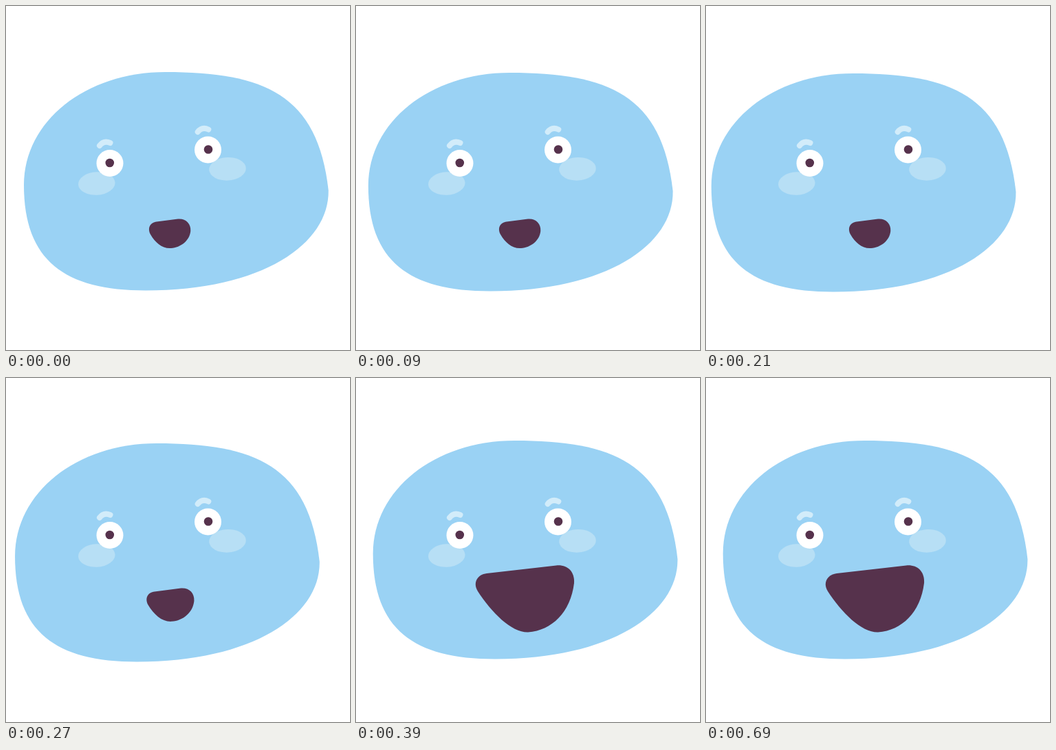
Write an HTML page that moves like this. It is 500x500 px and loops after 1650 ms.

```html
<!DOCTYPE html>
<html lang="en">
<head>
<meta charset="utf-8">
<title>Cheerful blob</title>
<style>
  html, body { margin: 0; width: 100%; height: 100%; overflow: hidden; background: #fff; }
  svg { display: block; width: 100%; height: 100%; }
  .cheek { fill: #b7dff5; }
  .brow { fill: none; stroke: #d2ecfa; stroke-width: 8; stroke-linecap: round; }
  .white { fill: #fff; }
  .dark { fill: #56324c; }
</style>
</head>
<body>
<svg viewBox="0 0 500 500">
  <path id="body" fill="#9ad2f4" d="M232 96C375 96 453 128 468.7 268C470 346 372 413.5 203 413.5C85 413.5 26 370 26 260C26 168 115 96 232 96Z"/>
  <ellipse class="cheek" cx="131.8" cy="258" rx="26.8" ry="16.8" transform="rotate(-3 131.8 258)"/>
  <ellipse class="cheek" cx="322" cy="236.8" rx="26.8" ry="16.8" transform="rotate(-3 322 236.8)"/>
  <path class="brow" d="M136 203Q142 195 151.5 199"/>
  <path class="brow" d="M278.7 183Q285 175 294.3 179.5"/>
  <circle class="white" cx="151" cy="228.5" r="19.5"/>
  <ellipse id="eye" class="white" cx="293.5" cy="209" rx="19.5" ry="19.5"/>
  <circle class="dark" cx="150.8" cy="228" r="6.3"/>
  <circle class="dark" cx="294" cy="208.5" r="6.3"/>
  <path id="mouth" class="dark"/>
</svg>
<script>
  const LOOP = 1650, TICK = 30;
  const body = document.getElementById('body');
  const eye = document.getElementById('eye');
  const mouth = document.getElementById('mouth');

  // start point, top edge, then four curves around the lips
  const small = [219,313.5, 250,309.5, 261,308.5, 269,316, 268.3,327, 267,341, 254,351, 240,352,
                 227,353, 217,344, 210,332, 205,322, 210,314.5, 219,313.5];
  const wide = [190,284, 291,272.5, 307,271, 318,281, 317,298, 312,340, 285,367, 250,369.5,
                226,370, 198,342, 177,310, 169,297, 177,285.5, 190,284];

  const mix = (a, b, k) => a + (b - a) * k;
  const span = (t, from, to) => Math.min(1, Math.max(0, (t - from) / (to - from)));
  const ease = k => (1 - Math.cos(Math.PI * k)) / 2;

  function moveBody(t) {
    const out = ease(span(t, 0, 195));
    const back = ease(span(t, 195, 390));
    const lift = back + 0.55 * back * (1 - back);
    const x = -18.5 * out + 17.2 * back;
    const y = 2.2 * out - 7.3 * lift;
    body.setAttribute('transform', `translate(${x} ${y})`);
  }

  function openMouth(t) {
    const k = ease(span(t, 238, 390));
    const p = small.map((v, i) => mix(v, wide[i], k));
    mouth.setAttribute('d', `M${p.slice(0, 2)}L${p.slice(2, 4)}C${p.slice(4)}Z`);
  }

  function blink(t) {
    const open = Math.min(1, 0.165 + Math.abs(t - 615) / 90);
    eye.setAttribute('ry', 19.5 * open);
  }

  function draw(now) {
    const t = Math.floor((now % LOOP) / TICK) * TICK;
    moveBody(t);
    openMouth(t);
    blink(t);
  }

  let start;
  function loop(now) {
    start ??= now;
    draw(now - start);
    requestAnimationFrame(loop);
  }
  draw(0);
  requestAnimationFrame(loop);
</script>
</body>
</html>
```
